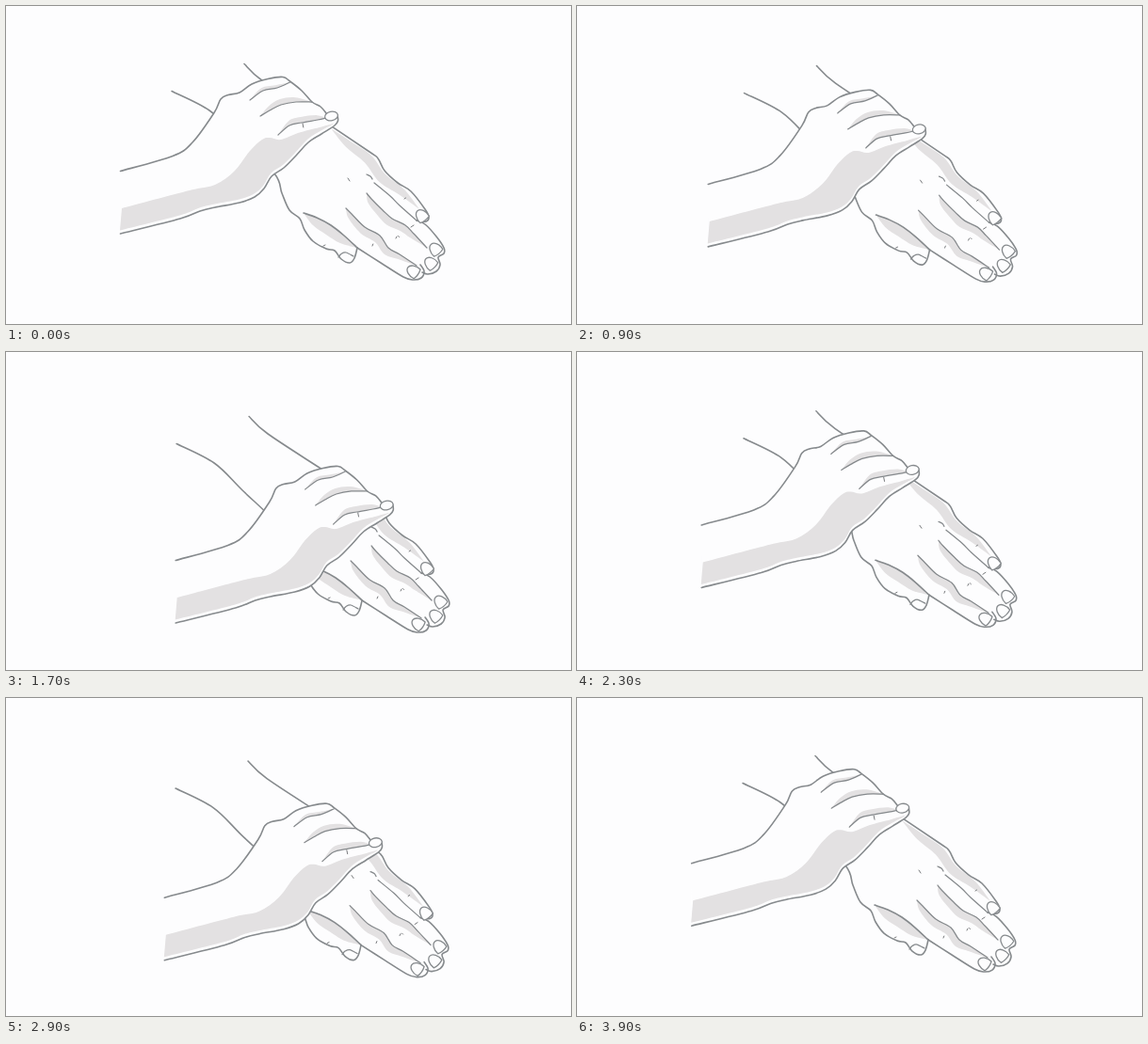
An HTML page for the animation above (4 s loop, 600 px wide and 338 px high).

```html
<!DOCTYPE html>
<html lang="en">
<head>
<meta charset="utf-8">
<title>Rubbing hands</title>
<style>
  html, body { margin: 0; width: 100%; height: 100%; overflow: hidden; background: #fdfdfe; }
  svg { display: block; width: 100vw; height: 100vh; }
  path { stroke-linecap: round; stroke-linejoin: round; }
  .line { fill: none; stroke: #868a8d; stroke-width: 1.6; }
  .thin { fill: none; stroke: #85898c; stroke-width: 1.25; }
  .tick { fill: none; stroke: #77797c; stroke-width: 1; }
  .shade { fill: #e3e1e2; }
  .skin { fill: #fdfdfe; }
  .nail { fill: #fdfdfe; stroke: #868a8d; stroke-width: 1.3; }
</style>
</head>
<body>
<svg viewBox="0 0 600 338" preserveAspectRatio="none">
  <g id="under"></g>
  <g id="over"></g>
</svg>
<script>
const under = document.getElementById('under');
const over = document.getElementById('over');

const points = text => text.split(' ').map(s => s.split(',').map(Number));
const shift = (pts, dx, dy) => pts.map(([x, y]) => [x + dx, y + dy]);

// Smooth path through the key points
function curve(p) {
  let d = `M${p[0]}`;
  for (let i = 0; i < p.length - 1; i++) {
    const a = p[i], b = p[i + 1];
    const before = p[i - 1] || a, after = p[i + 2] || b;
    const c1 = a.map((v, k) => v + (b[k] - before[k]) / 6);
    const c2 = b.map((v, k) => v - (after[k] - a[k]) / 6);
    d += `C${c1} ${c2} ${b}`;
  }
  return d;
}

function add(group, cls, d, transform = '') {
  const el = document.createElementNS('http://www.w3.org/2000/svg', 'path');
  el.setAttribute('class', cls);
  el.setAttribute('d', d);
  el.setAttribute('transform', transform);
  group.append(el);
}

const draw = (group, cls, text) => add(group, cls, curve(points(text)));

// Crescent shadow that swells away from a line by (dx, dy)
function band(group, text, dx, dy) {
  const p = points(text), n = p.length - 1;
  const edge = p.map(([x, y], i) => {
    const w = Math.sin(Math.PI * i / n) ** 0.6;
    return [x + dx * w, y + dy * w];
  });
  add(group, 'shade', curve(p) + curve(edge.reverse()).replace('M', 'L') + 'Z');
}

function crease(group, cls, text, dx, dy) {
  band(group, text, dx, dy);
  draw(group, cls, text);
}

const nail = (x, y, angle) => add(under, 'nail',
  'M5,-6C-1,-7 -7,-4 -7,0S-1,7 5,6Q7,0 5,-6Z', `translate(${x} ${y}) rotate(${angle})`);

// Lower hand
band(under, '345,130 366,144 388,159 403,179 423,195 439,216', -7, 8);
crease(under, 'thin', '383,199 388,205 400,217 410,226 424,233 433,242 447,257', -5, 7);
crease(under, 'thin', '361,215 367,221 381,235 397,244 406,257 418,264 436,276', -5, 7);
crease(under, 'line', '316,220 330,225 345,233 359,244 373,257', -5, 10);
draw(under, 'line', '176,90.5 216,111 246,140 285,178 293,199 301,217 312,226 317,238 326,250 340,258 349,260 356,269 365,273 370,268 373,257');
draw(under, 'line', '253,61.5 273,80 337,122 386,155 395,162 402,175 416,188 430,197 445,216 449,224 446,229 437,228');
draw(under, 'line', '373,257 398,273 422,288 432,291 441,289 444,282 440,275');
draw(under, 'line', '436,228 445,232 457,245 465,257 465,263 459,267 461,275 457,282 448,285 442,283');
draw(under, 'thin', '391,188 408,202 418,212 436,228');
draw(under, 'thin', '383,179 387,181 389,184');
nail(441.5, 223, 52);
nail(456, 258.5, 50);
nail(451, 273.5, 45);
nail(432.5, 282, 35);
draw(under, 'thin', '353,267 356,263.5 361,262 369,266');
add(under, 'tick', 'M363,183l2,3M423,205l1.5-1M414,247l1-2M416.5,244.5l1,1M430,235l3-2M337,255l2-1M389,255l.8-2');

// Upper hand: its skin hides the lower one
const back = points('121.5,175.5 177,159.5 198,145 221,113.5 228,99 236,94.5 248,92 261,83 278,77.5 294,75.5 301.5,80 314,90 325,102 334,107 340,114');
const side = points('352,116 352.5,122 349,127 335,136 321,145 308,159 295,172 282,181 274,194 264,203 248,209 222,214 206,218 185,226 121.5,242');
const rim = points('123,215 195,196 222,190 243,175 259,154 272,142 280,140 292,142 310,135 333,129 348,125');
add(over, 'skin', curve(back.concat(side)) + 'Z');
add(over, 'shade', curve(rim.concat(shift(side.slice(3), -0.5, -3.5))) + 'Z');
crease(over, 'thin', '259,100 273,90 288,87 301.5,81', -2, -3);
crease(over, 'thin', '270,117 280,111 292,105 308,102 325,102', -1, -6);
crease(over, 'thin', '289,137 301,127 314,124 331,121 340,119', -1, -6);
add(over, 'line', curve(back));
add(over, 'line', curve(side));
add(over, 'nail', 'M-7,0A7,4.8 0 1 1 7,0A7,4.8 0 1 1 -7,0Z', 'translate(345.5 117) rotate(-12)');
add(over, 'tick', 'M315,125l.8,4');

// Three strokes out and back per loop, each way slowing to a stop
const LOOP = 4000, HALF = LOOP / 6, STEP = 100;

function reach(t) {
  const n = Math.floor(t / HALF);
  const out = 1 - (1 - (t / HALF - n)) ** 3;
  return n % 2 ? 1 - out : out;
}

function render(ms) {
  const p = reach(Math.floor(ms / STEP) * STEP % LOOP);
  under.setAttribute('transform', `translate(${5.6 * p} ${7.7 * p})`);
  over.setAttribute('transform', `translate(${64.6 * p} ${50.6 * p})`);
}

const start = performance.now();
function tick() {
  render(performance.now() - start);
  requestAnimationFrame(tick);
}
tick();
</script>
</body>
</html>
```
